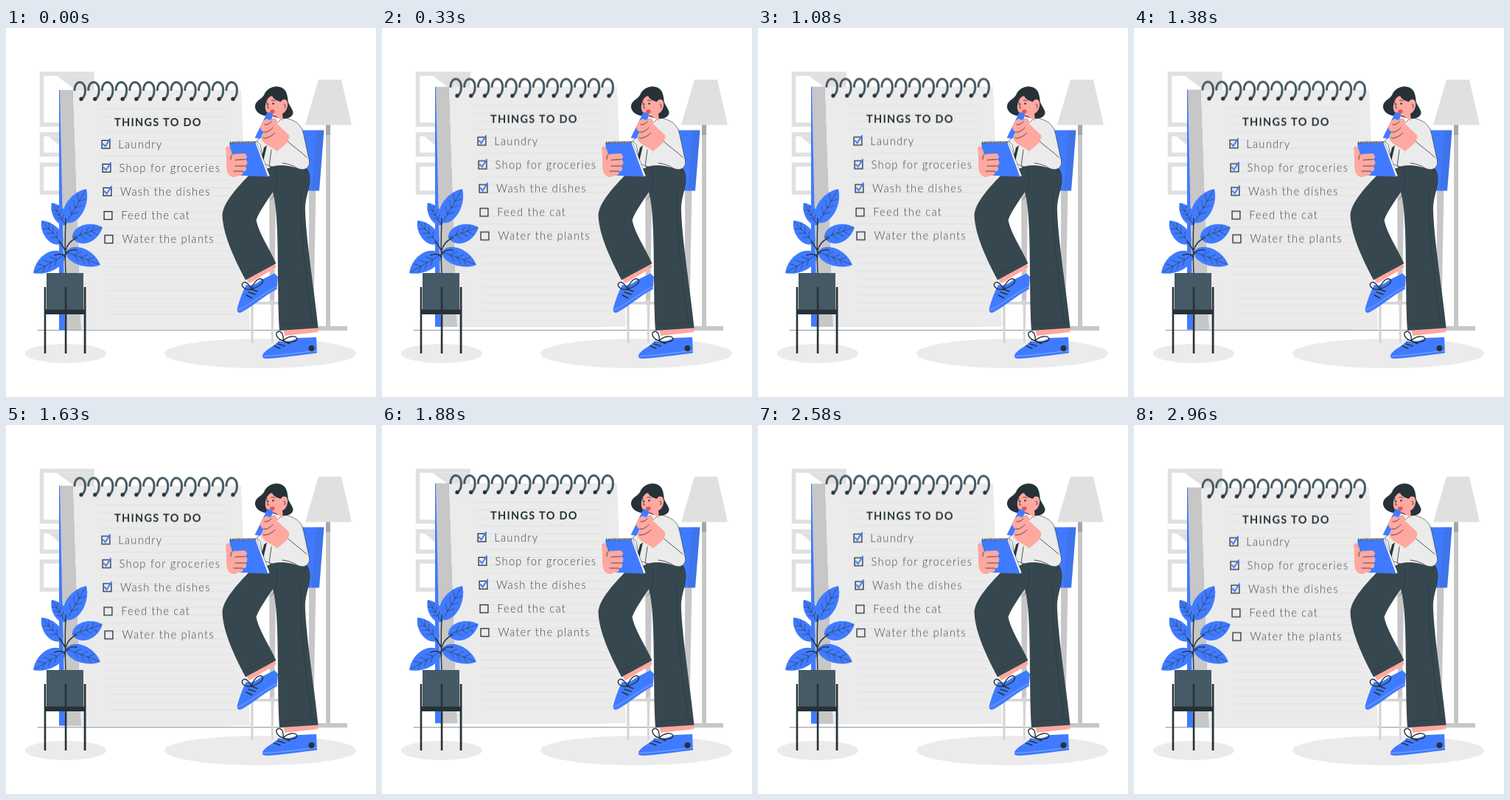
An HTML page that plays this animation: 502 px wide and 500 px high, repeating every 3 s.

```html
<!DOCTYPE html>
<html lang="en">
<head>
<meta charset="utf-8">
<title>Things to do</title>
<style>
html, body { margin: 0; width: 100%; height: 100%; overflow: hidden; background: #fff; }
svg { display: block; width: 502px; height: 500px; }
.pad { animation: bob 1.5s linear -40ms infinite; }
@keyframes bob { 50% { transform: translateY(-10px); } }
text { font-family: Lato, "Open Sans", sans-serif; fill: #37474f; }
.title { font-size: 14.5px; font-weight: 700; letter-spacing: 1.3px; fill: #263238; }
.item { font-size: 14.8px; font-weight: 300; letter-spacing: 1.2px; }
.blue { fill: #407bff; }
.skin { fill: #ffa8a0; }
.dark { fill: #263238; }
.cloth { fill: #37474f; }
.pale { fill: #ebebeb; }
.grey { fill: #c7c7c7; }
.line { fill: none; stroke: #263238; stroke-width: .8; stroke-linecap: round; stroke-linejoin: round; }
.thick { stroke-width: 1.4; }
.thin { stroke-width: .5; }
.sole { fill: none; stroke: #fff; stroke-width: .7; opacity: .5; }
</style>
</head>
<body>
<svg viewBox="0 0 502 500">
  <!-- wall and floor -->
  <g fill="none" stroke="#e0e0e0" stroke-width="5.500">
    <rect x="48.500" y="62" width="68.500" height="69"/>
    <rect x="48.500" y="144" width="68.500" height="27.500"/>
    <rect x="48.500" y="185" width="68.500" height="38"/>
  </g>
  <path fill="#e0e0e0" d="M69 65H114V98ZM58 147H90V174Z"/>
  <path class="line thin" d="M43 409.500H460"/>
  <ellipse class="pale" cx="81" cy="441" rx="55" ry="13"/>
  <ellipse class="pale" cx="345" cy="441" rx="130" ry="20"/>

  <!-- lamp -->
  <path class="grey" d="M434 131H440V404H463V410H421V404H434Z"/>
  <path fill="#a6a6a6" d="M434 131H440V145H434Z"/>
  <path fill="#e0e0e0" d="M424 70H455L469 131.500H406Z"/>

  <!-- notepad -->
  <g class="pad">
    <path class="blue" d="M72 84.500H291L303 410H72Z"/>
    <path class="grey" d="M73 84.500H90.500L101.500 410H80Z"/>
    <path class="pale" d="M90.500 84.500H319L331 410H101.500Z"/>
    <g id="rules" stroke="#e0e0e0" stroke-width=".8"></g>
    <text class="title" x="147" y="133.600">THINGS TO DO</text>
    <g id="items"></g>
    <g id="rings"></g>
  </g>

  <!-- plant -->
  <g id="leaves"></g>
  <g class="line thick">
    <path d="M81 334C80 310 80 285 81 258M81 304Q79 297 72 289M81 301Q84 290 96 284M81 311Q76 304 66 308M81 307Q86 299 96 301"/>
  </g>
  <path fill="#455a64" d="M55 332H105V383H55Z"/>
  <path class="dark" d="M52 381.500H108.500V388H52ZM51.700 351H54.300V441H51.700ZM79.800 351H82.400V441H79.800ZM105.700 351H108.500V441H105.700Z"/>

  <!-- chair -->
  <path class="grey" d="M357 205H366.500L364 375H358ZM411 215H420.500L417 405H411Z"/>
  <path fill="#d5d5d5" d="M332 370H335.500V427H332.500ZM359.500 368H363.500L362.500 427H360ZM334 371H372V374.500H334Z"/>
  <path class="blue" d="M396 138.500H431.500L425 220.500H398Z"/>
  <path class="dark" opacity=".1" d="M421 138.500H431.500L425 220.500H415Z"/>

  <!-- raised foot and leg -->
  <path class="skin" d="M325 338L363 317L367 324L330 346Z"/>
  <path class="blue" d="M314 379C317 368 321 357 326 348C334 351 341 345 347 341L364 332.500L369 337L367.500 354C350 363 335 377 319 385.500C314 387 313 383 314 379Z"/>
  <path class="sole" d="M315 382C329 376 350 359 368 350"/>
  <path class="line thick" d="M333 354C325 356 318 350 321 346C325 341 331 349 333 354C336 344 343 337 348 341C351 347 339 352 333 354M329 358L338 361M326 362L334 366M333 354L341 357"/>
  <path class="cloth" d="M361 188L329 200C309 221 295 238 293.500 253C294 283 315 322 325 341.500L366.500 319C358 300 342 276 339.500 260C345 245 360 227 368 212Z"/>
  <path class="line thin" d="M322 335L363 313"/>

  <!-- standing foot and leg -->
  <path class="skin" d="M376 406H423.500V412L378 417Z"/>
  <path class="blue" d="M348 443C352 435 365 431 370 424C379 427 388 424 396 420L421 419L422 440.500C400 443 375 447 355 448C349 448 347 447 348 443Z"/>
  <path class="sole" d="M348 444.500C370 444 398 440 422 437"/>
  <circle class="dark" cx="414.500" cy="434" r="4"/>
  <path class="line thick" d="M376 424C368 422 364 414 369 411.500C375 410 377 418 376 424C383 417 393 416 395 421C394 426 382 427 376 424M369 428L378 431M364 431L372 434M376 424L385 428"/>
  <path class="cloth" d="M359 186L402 186C411 189 414 199 412 212C410 224 405 233 406 250C408 295 419 360 423.500 406.500L371 410C368 365 370 300 367 258C366 235 361 214 355 201Z"/>
  <path class="line thin" d="M372 402L422 399M367 195C370 215 364 226 360 232M408 192Q405 202 397 206M400 219C398 270 408 350 416 398"/>

  <!-- shirt -->
  <path fill="#ebebeb" stroke="#263238" stroke-width=".6" d="M376 121C393 125 401 130 404 145L411.500 180C413 188 406 194 398 191C385 187 375 185 361 188L350 184L345 158L340 153L353 142Z"/>
  <path class="dark" d="M350 162L354 159L349 181L346.500 176Z"/>
  <path class="line" d="M379 151C388 159 399 167 408 175M357 188L360 165M375 183Q386 184 395 190"/>

  <!-- head -->
  <path class="dark" d="M350 91C354 80 368 76 376 82C382 86 382 95 383 101C386 108 391 112 389 117C385 125 371 124 361 119C352 121 340 117 338 108C337 99 345 98 350 91Z"/>
  <path class="skin" d="M358 93C353 97 351 104 352 110C354 117 359 119.500 365 119L376 126L375 116C382 113 385 100 379 97C376 96 374 98 373 100C369 99 363 97 361 92Z"/>
  <path class="line" d="M352 101L355 99.500M360 98Q363 97 365 99M356 103L354.500 108L357 108.500M377 103Q380 103 378 108"/>
  <circle class="dark" cx="354.500" cy="102.800" r="1"/>
  <circle class="dark" cx="362.500" cy="102.500" r="1.200"/>
  <path fill="#e5574d" d="M358 112Q363 108 365 113Q363 117 359 116Z"/>

  <!-- pen and writing hand -->
  <path class="blue" d="M355 113.500L362 117.500L345 150L337.500 149Z"/>
  <path class="skin" d="M346 131C349 124 355 121 359 123C365 120 369 124 368 130L384 145C386 153 377 160 368 167C361 161 352 159 348 153C345 149 348 144 350 141C345 139 344 134 346 131Z"/>
  <path class="line" d="M350 141C354 142 358 139 362 135M349 149C355 150 361 146 365 142M351 131Q357 131 360 127"/>
  <path class="blue" d="M352 118L358 114L363 118L359 125L353 123Z"/>

  <!-- small notebook and holding hand -->
  <path fill="#fff" stroke="#263238" stroke-width=".5" d="M306 155L340 154.500L358 200.500L355 201.500Z"/>
  <path class="blue" d="M303 156L338.500 155.500L355.500 201.500L308 199.500Z"/>
  <path class="line" stroke-dasharray="1 1.400" style="stroke-width:3;stroke-linecap:butt" d="M304 155.300L339 154.600"/>
  <path class="skin" d="M298 163C300 157 304 160 307 171L323 170C328 171 328 177 324 178C329 180 328 186 324 187C328 190 326 195 321 194C323 199 319 200 315 200C308 204 302 201 300 194C298 186 300 177 298 163Z"/>
  <path class="line" d="M307 171Q304 174 305 178M311 179L324 178M311 187L324 187M309 194L321 194"/>
</svg>
<script>
const fill = (id, parts) => document.getElementById(id).innerHTML = parts.join("");
const range = (n, f) => Array.from({ length: n }, (_, i) => f(i));

fill("rules", range(27, i => {
  const y = 110.2 + i * 10.7, x = 125 + (y - 110) * 0.043;
  return `<path d="M${x} ${y}h176"/>`;
}));

const tasks = ["Laundry", "Shop for groceries", "Wash the dishes", "Feed the cat", "Water the plants"];
fill("items", tasks.map((task, i) => {
  const x = 135.3 + i, y = 158.1 + i * 32.1;
  const tick = i < 3 ? `<path d="M${x - 4} ${y - 1}l3.400 3.800l6.800 -10.500" fill="none" stroke="#407bff" stroke-width="2"/>` : "";
  return `<rect x="${x - 5.2}" y="${y - 5.2}" width="10.800" height="10.800" fill="none" stroke="#263238" stroke-width="1.300"/>${tick}
    <text class="item" x="${152.3 + i * 1.3}" y="${y + 5.3}">${task}</text>`;
}));

fill("rings", range(12, i => `<g transform="translate(${i * 18.72} 0)">
  <path d="M93 85.500C92.500 70.500 107.500 70.500 107.500 84.500C107.500 91 105.500 95 102.500 97" fill="none" stroke="#455a64" stroke-width="3"/>
  <circle class="dark" cx="102" cy="96.700" r="2.600"/></g>`));

// Leaf from base to tip; left and right are the bulges seen along the way.
function leaf(bx, by, tx, ty, left, right) {
  const len = Math.hypot(tx - bx, ty - by);
  const turn = Math.atan2(ty - by, tx - bx) * 180 / Math.PI;
  const veins = range(3, i => {
    const x = len * (0.25 + i * 0.19), dx = len * 0.14;
    return `M${x} 0l${dx} ${-left * 0.4}M${x} 0l${dx} ${right * 0.4}`;
  }).join("");
  return `<g transform="translate(${bx} ${by}) rotate(${turn})">
    <path class="blue" d="M0 0C${len * 0.1} ${-left} ${len * 0.7} ${-left} ${len} 0C${len * 0.7} ${right} ${len * 0.1} ${right} 0 0Z"/>
    <path class="line thin" d="M0 0H${len * 0.94}${veins}"/></g>`;
}
fill("leaves", [
  leaf(82, 264, 109, 218, 18, 16), leaf(81, 267, 62, 237, 11, 13),
  leaf(90, 284, 131, 270, 15, 18), leaf(76, 292, 48, 261, 15, 13),
  leaf(80, 307, 37, 332, 14, 19), leaf(81, 303, 128, 321, 17, 14)
]);
</script>
</body>
</html>
```
